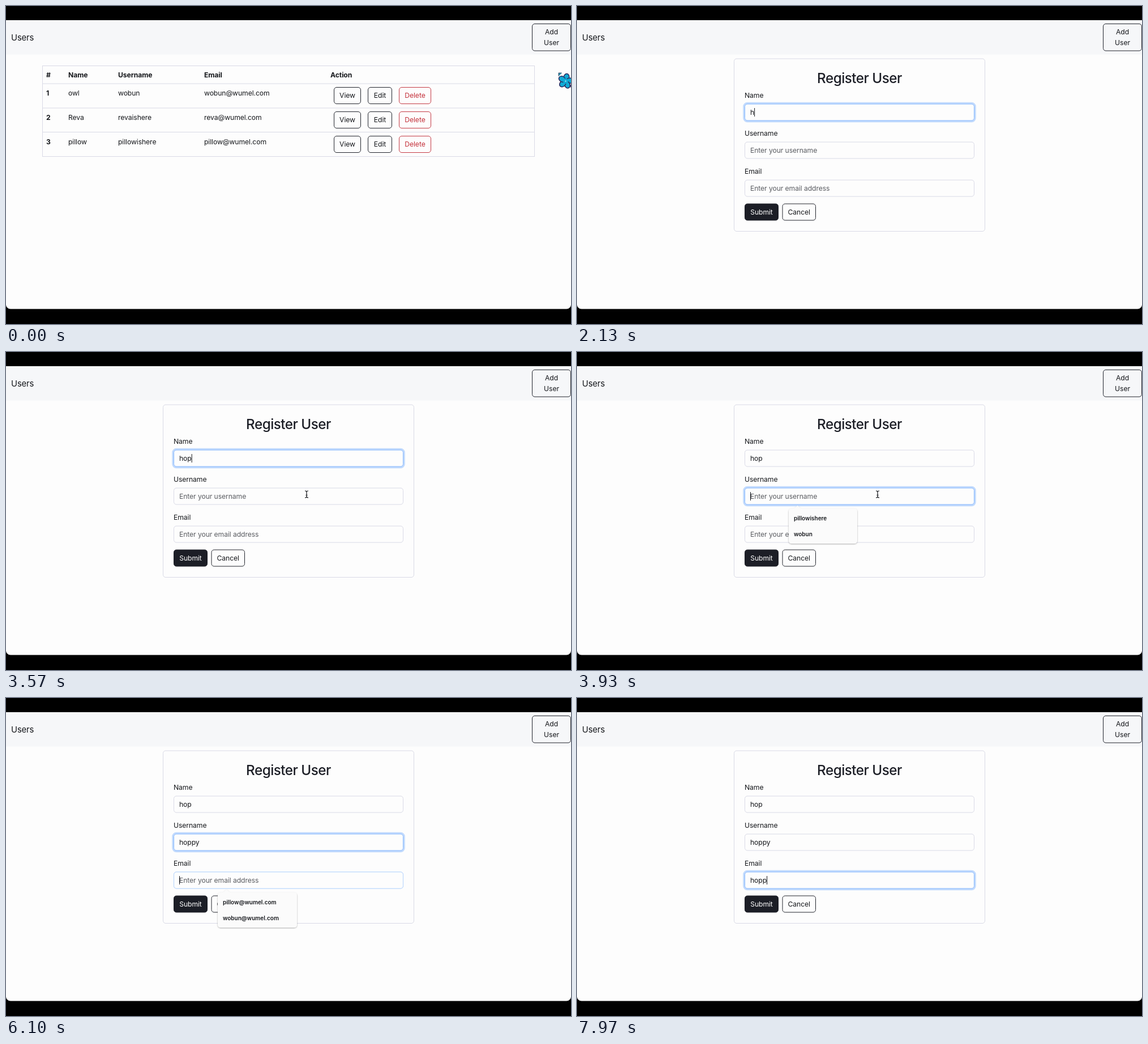
These frames come from a looping animation (998x561 px, 8 s). An HTML page:

```html
<!DOCTYPE html>
<html lang="en">
<head>
<meta charset="utf-8">
<title>Users</title>
<style>
  html, body { margin: 0; width: 100%; height: 100%; overflow: hidden; background: #000; }
  svg { display: block; width: 100%; height: 100%; }
  text { font: 400 12.2px Inter, "Liberation Sans", sans-serif; letter-spacing: -0.008em; fill: #15171b; white-space: pre; }
  .bold { font-weight: 700; }
  .mid { text-anchor: middle; }
  .brand { font-size: 14.8px; }
  .title { font-size: 24.2px; font-weight: 500; letter-spacing: -0.02em; fill: #1c1e26; }
  .hint { fill: #5b5d62; }
  .pick { font-size: 10px; font-weight: 600; letter-spacing: 0; }
  .line { fill: none; stroke: #d9dae6; }
  .btn { fill: transparent; stroke: #22252d; }
  .red .btn { stroke: #c43a44; }
  .red text { fill: #c4303a; }
  .dark .btn { fill: #1c1e26; stroke: #1c1e26; }
  .dark text { fill: #fff; }
</style>
</head>
<body>
<svg id="stage" viewBox="0 0 998 561"></svg>
<script>
const LOOP = 8000, FORM_AT = 1330, RING_MS = 150, TEXT_X = 306;

const users = [
  ["owl", "wobun", "wobun@wumel.com"],
  ["Reva", "revaishere", "reva@wumel.com"],
  ["pillow", "pillowishere", "pillow@wumel.com"]
];

// focus and blur are times; keys are the times of the typed letters
const fields = [
  { label: "Name", hint: "Enter your name", y: 173, value: "hop", focus: 1290, blur: 3680,
    keys: [2000, 2250, 2500], picks: ["pillow", "wob", "owl"], w: 121 },
  { label: "Username", hint: "Enter your username", y: 240, value: "hoppy", focus: 3680, blur: 6100,
    keys: [4300, 4520, 4730, 4940, 5150], picks: ["pillowishere", "wobun"], w: 121 },
  { label: "Email", hint: "Enter your email address", y: 307, value: "hopp", focus: 6100, blur: LOOP + RING_MS,
    keys: [7050, 7300, 7550, 7800], picks: ["pillow@wumel.com", "wobun@wumel.com"], w: 140 }
];

// Pointer strokes: each is a list of [time, x, y]
const strokes = [
  [[0, 976, 118], [30, 976, 118], [230, 960, 58], [FORM_AT, 960, 58]],
  [[FORM_AT, 535, 175], [2000, 535, 175]],
  [[2990, 535, 176], [3070, 536, 208], [3380, 531, 251], [4300, 531, 251]]
];

const text = (x, y, s, cls = "") => `<text x="${x}" y="${y}" class="${cls}">${s}</text>`;
const box = (x, y, w, h, attrs) => `<rect x="${x}" y="${y}" width="${w}" height="${h}" ${attrs}/>`;
const button = (x, y, w, h, lines, cls = "", id = "") => {
  const first = y + h / 2 + 4.4 - (lines.length - 1) * 9.3;
  return `<g class="${cls}" id="${id}">` + box(x, y, w, h, 'rx="4.5" class="btn"') +
    lines.map((s, i) => text(x + w / 2, first + i * 18.6, s, "mid")).join("") + "</g>";
};

function tableView() {
  const cols = [71, 110, 198, 350, 573];
  let out = box(64.5, 105.5, 869, 160, 'class="line"') +
    `<path class="line" d="M64 137H934M64 180H934M64 222.5H934"/>` +
    ["#", "Name", "Username", "Email", "Action"].map((s, i) => text(cols[i], 125.5, s, "bold")).join("");
  users.forEach((user, r) => {
    const y = r * 43;
    out += text(cols[0], 157.5 + y, r + 1, "bold") +
      user.map((s, i) => text(cols[i + 1], 157.5 + y, s)).join("") +
      button(579.5, 143.5 + y, 47, 29, ["View"]) +
      button(639.5, 143.5 + y, 42, 29, ["Edit"]) +
      button(694.5, 143.5 + y, 56, 29, ["Delete"], "red");
  });
  return out;
}

function fieldView(f, i) {
  return text(296, f.y - 11.5, f.label) +
    box(296.5, f.y, 405, 29, `rx="4.5" fill="none" stroke="#86b7fe" id="ring${i}"`) +
    box(296.5, f.y, 405, 29, `rx="4.5" fill="#fdfdfd" stroke="#d9dae6" id="input${i}"`) +
    text(TEXT_X, f.y + 19, "", "hint").replace("<text", `<text id="value${i}"`) +
    `<path id="caret${i}" d="M0 ${f.y + 7}v15" stroke="#15171b"/>`;
}

function picksView(f, i) {
  const top = f.y + 36, h = f.picks.length * 28 + 6;
  return `<g id="picks${i}" filter="url(#shade)">` +
    box(374, top, f.w, h, 'rx="5" fill="#fbfbfb"') +
    `<path d="M383 ${top + .5}l6.500-5.500 6.500 5.500z" fill="#fbfbfb"/>` +
    f.picks.map((s, n) => text(383, top + 20.700 + n * 28, s, "pick")).join("") + "</g>";
}

function formView() {
  return box(277.5, 93, 443, 304.5, 'rx="4.5" class="line"') +
    text(499, 135.5, "Register User", "title mid") +
    fields.map(fieldView).join("") +
    button(296.5, 349, 59, 29, ["Submit"], "dark") +
    button(363, 349, 58.5, 29, ["Cancel"]) +
    fields.map(picksView).join("");
}

// Pointer art, with the hot spot at 0,0
function bloomView() {
  const petals = [0, 72, 144, 216, 288].map(a =>
    `<ellipse cx="0" cy="-7" rx="4.800" ry="6.200" transform="rotate(${a + 12})"/>`).join("");
  return `<path d="M0 0h6l-6 6z" fill="#2c8fa6"/><path d="M0 5.500V0h5.500" fill="none" stroke="#35385f" stroke-width=".8"/>
    <path d="M15 17q9 5 10.500 18" fill="none" stroke="#342c62" stroke-width="2.600" stroke-linecap="round"/>
    <g transform="translate(12.500 14.500)"><g fill="#10a9d4" stroke="#2f2b5e" stroke-width="1.500">${petals}</g>
    <circle r="4.500" fill="#10a9d4"/><circle r="1.100" fill="#d8f3fa"/></g>`;
}

const stage = document.getElementById("stage");
stage.innerHTML = `
  <defs><filter id="shade" x="-10%" y="-15%" width="120%" height="135%">
    <feDropShadow dx="0" dy="1" stdDeviation="1.300" flood-color="#000" flood-opacity=".32"/></filter></defs>
  <path d="M0 25H998V526a8 8 0 0 1-8 8.500H8a8 8 0 0 1-8-8.500z" fill="#fdfdfd"/>
  ${box(0, 25, 998, 60.5, 'fill="#f6f7f9"')}
  ${text(9, 61.3, "Users", "brand")}
  ${button(929.5, 31.5, 68, 47.5, ["Add", "User"], "", "add")}
  <g id="table">${tableView()}</g>
  <g id="form">${formView()}</g>
  <g id="bloom">${bloomView()}</g>
  <path id="beam" d="M-3-6q3 0 3 2q0-2 3-2M0-4V4M-3 6q3 0 3-2q0 2 3 2M-1.500 1.500h3" fill="none" stroke="#15171b" stroke-width="1.200"/>`;

const el = {};
stage.querySelectorAll("[id]").forEach(node => { if (node.id) el[node.id] = node; });

const show = (node, on) => { node.style.display = on ? "" : "none"; };
const clamp = v => Math.max(0, Math.min(1, v));
const ease = v => v * v * (3 - 2 * v);

function pointerAt(t) {
  const stroke = strokes.find(s => t >= s[0][0] && t < s[s.length - 1][0]);
  if (!stroke) return null;
  const n = stroke.findIndex(k => k[0] > t);
  const [t0, x0, y0] = stroke[n - 1], [t1, x1, y1] = stroke[n];
  const p = ease((t - t0) / (t1 - t0));
  return { x: x0 + (x1 - x0) * p, y: y0 + (y1 - y0) * p };
}

function drawField(f, i, t) {
  const typed = f.keys.filter(k => k <= t).length;
  const focused = t >= f.focus && t < f.blur;
  const glow = ease(clamp((t - f.focus) / RING_MS)) * (1 - ease(clamp((t - f.blur) / RING_MS)));
  const value = el["value" + i];
  value.textContent = typed ? f.value.slice(0, typed) : f.hint;
  value.setAttribute("class", typed ? "" : "hint");

  const ring = el["ring" + i];
  ring.setAttribute("stroke-width", 1 + 5.5 * glow);
  ring.setAttribute("stroke-opacity", .5);
  show(ring, glow > 0);
  el["input" + i].setAttribute("stroke", glow > 0 ? "#86b7fe" : "#d9dae6");
  el["input" + i].setAttribute("stroke-opacity", glow > 0 ? .5 + .5 * glow : 1);

  const last = typed ? f.keys[typed - 1] : f.focus;
  const caretX = TEXT_X + .5 + (typed ? value.getComputedTextLength() : 0);
  el["caret" + i].setAttribute("transform", `translate(${caretX} 0)`);
  show(el["caret" + i], focused && (t - last) % 1000 < 500);
  show(el["picks" + i], focused && !typed);
}

function draw(t) {
  const inForm = t >= FORM_AT;
  show(el.table, !inForm);
  show(el.form, inForm);
  if (inForm) fields.forEach((f, i) => drawField(f, i, t));

  const at = pointerAt(t);
  const overField = at && inForm && fields.some(f => at.y >= f.y && at.y <= f.y + 29);
  show(el.bloom, at && !overField);
  show(el.beam, overField);
  if (at) {
    const move = `translate(${at.x} ${at.y})`;
    el.bloom.setAttribute("transform", move);
    el.beam.setAttribute("transform", move);
  }
  el.add.setAttribute("class", at && at.x > 929 && at.y < 79 ? "dark" : "");
}

const start = performance.now();
function tick() {
  draw((performance.now() - start) % LOOP);
  requestAnimationFrame(tick);
}
draw(0);
requestAnimationFrame(tick);
</script>
</body>
</html>
```
